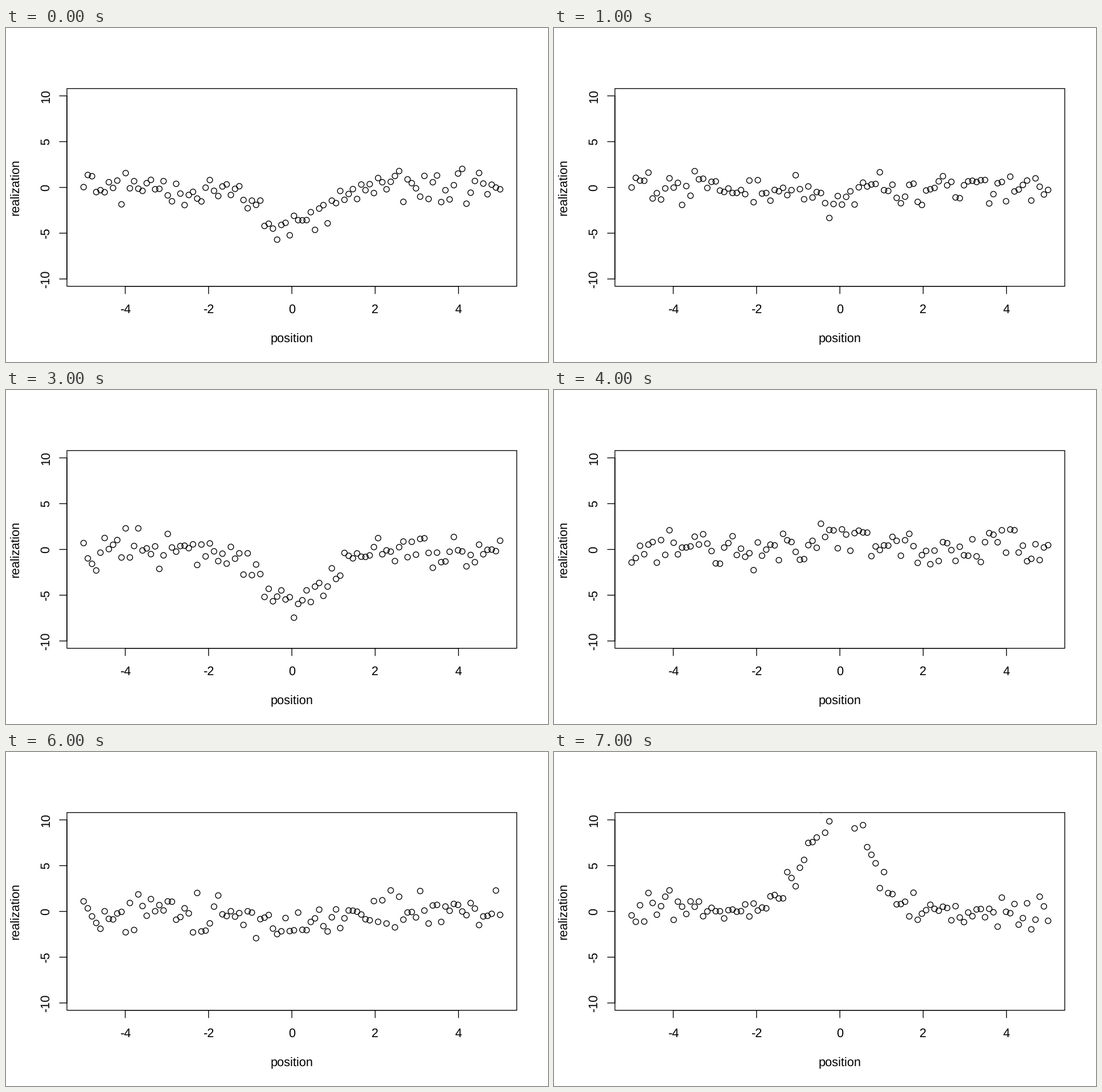
Recreate the animation shown at these times as a matplotlib script. Size 952x588 px, loop 8000 ms.

```python
import matplotlib.pyplot as plt
import numpy as np
from matplotlib.animation import FuncAnimation
from matplotlib.patches import Circle, Rectangle

plt.rcParams.update({
    "font.family": "Liberation Sans",
    "path.snap": False,
    "text.hinting": "none",
    "toolbar": "None",
})

W, H, DPI = 952, 588, 64
PT = 72 / DPI                 # points per pixel
LINE = 26.11                  # height of one margin line
FONT = LINE / 1.2 * PT
STROKE = 1.36 * PT
RADIUS = 4.9

# Plot box
LEFT, RIGHT = 4.1 * LINE, W - 2.1 * LINE
TOP, BOTTOM = 106.6, 454.7

# Every second a new noisy sample of a bell of another height
HEIGHTS = [-4.5, -1.5, -11.2, -6.3, 1.2, -12, -1.3, 12]
X = np.linspace(-5, 5, 100)


def px(x):
    return (LEFT + RIGHT) / 2 + x * (RIGHT - LEFT) / 10.8


def py(y):
    return (TOP + BOTTOM) / 2 - y * (BOTTOM - TOP) / 21.6


def realization(n):
    noise = np.random.default_rng(n + 11).normal(size=X.size).clip(-2.3, 2.3)
    return HEIGHTS[n] * np.exp(-X ** 2) + noise


fig = plt.figure(figsize=(W / DPI, H / DPI), dpi=DPI, facecolor="white")
ax = fig.add_axes([0, 0, 1, 1])
ax.set(xlim=(0, W), ylim=(H, 0))
ax.axis("off")


def line(x0, y0, x1, y1):
    ax.plot([x0, x1], [y0, y1], color="black", lw=STROKE, solid_capstyle="round")


def label(x, y, text, angle=0):
    ax.text(x, y, text, size=FONT, color="black", ha="center", va="baseline",
            rotation=angle, rotation_mode="anchor")


def outline(**style):
    return ax.add_patch(Rectangle((LEFT, TOP), RIGHT - LEFT, BOTTOM - TOP,
                                  fill=False, **style))


outline(ec="black", lw=STROKE, joinstyle="round")
clip = outline(ec="none", lw=0)

line(px(-4), BOTTOM, px(4), BOTTOM)
for v in range(-4, 5, 2):
    line(px(v), BOTTOM, px(v), BOTTOM + LINE / 2)
    label(px(v), BOTTOM + 1.8 * LINE, str(v))

line(LEFT, py(-10), LEFT, py(10))
for v in range(-10, 11, 5):
    line(LEFT, py(v), LEFT - LINE / 2, py(v))
    label(LEFT - 1.2 * LINE, py(v), str(v), 90)

label(px(0), BOTTOM + 3.8 * LINE, "position")
label(LEFT - 3.2 * LINE, py(0), "realization", 90)

dots = []
for x in X:
    dot = ax.add_patch(Circle((px(x), py(0)), RADIUS, fill=False, ec="black", lw=STROKE))
    dot.set_clip_path(clip)
    dots.append(dot)


def draw(n):
    for dot, x, y in zip(dots, X, realization(n)):
        dot.center = px(x), py(y)
    return dots


anim = FuncAnimation(fig, draw, frames=len(HEIGHTS), interval=1000, repeat=True)
plt.show()
```
